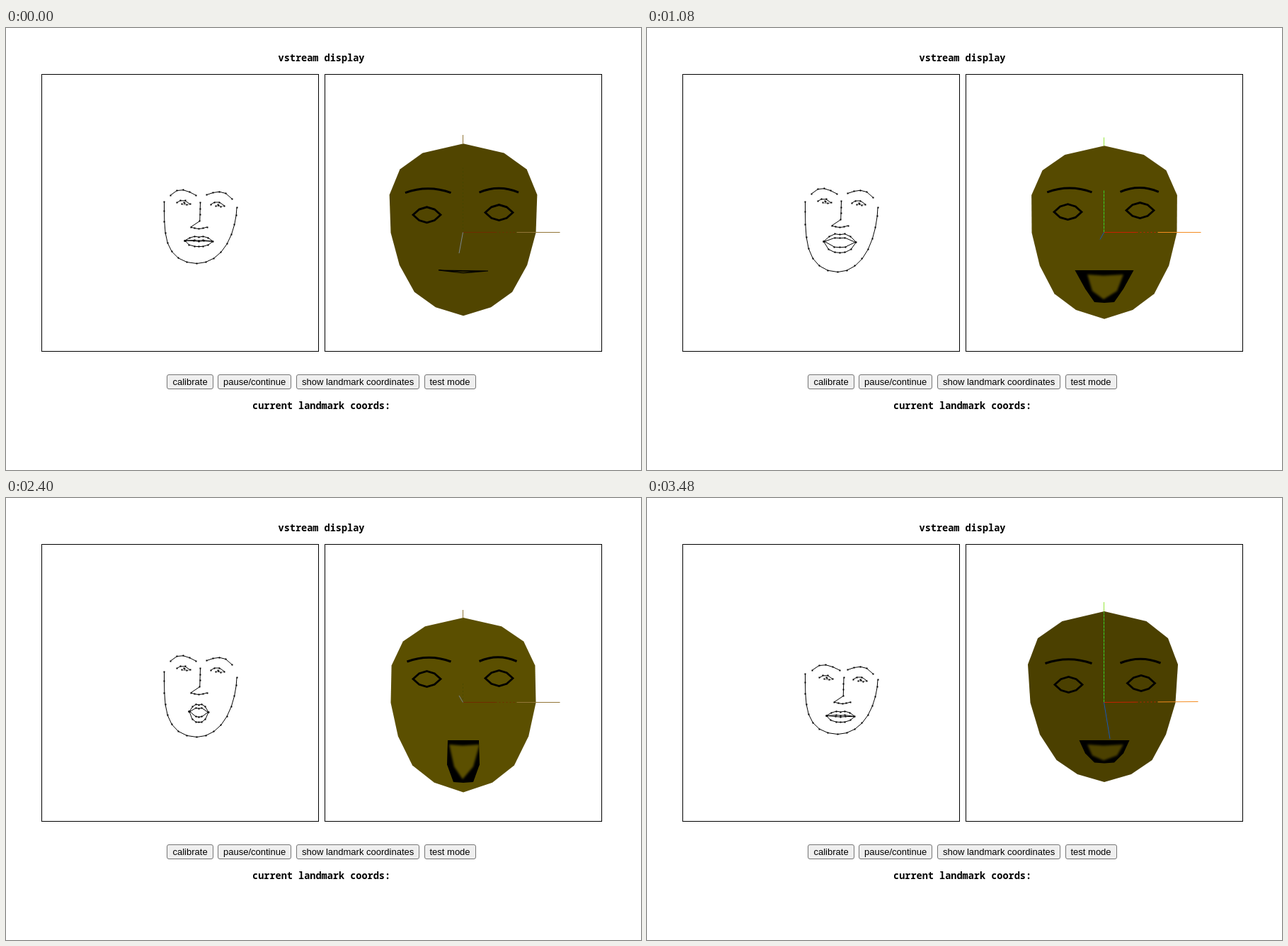
Animation, 897 px wide and 624 px high, one loop 3.6 s. Source, as an HTML page with a canvas:

```html
<!DOCTYPE html>
<html lang="en">
<head>
<meta charset="utf-8">
<title>vstream display</title>
<style>
html, body { margin: 0; width: 100%; height: 100%; overflow: hidden; background: #fff; }
svg, canvas { position: absolute; left: 0; top: 0; display: block; }
.head { font: bold 13.55px "Noto Sans Mono", "DejaVu Sans Mono", monospace; white-space: pre; }
.label { font: 13px "Liberation Sans", Arial, sans-serif; }
.panel { fill: none; stroke: #000; }
.button { fill: #efefef; stroke: #767676; }
</style>
</head>
<body>
<svg width="897" height="624" viewBox="0 0 897 624">
  <rect class="panel" x="50.5" y="65.5" width="391" height="391"/>
  <rect class="panel" x="450.5" y="65.5" width="391" height="391"/>
  <text class="head" x="384.5" y="47">vstream display</text>
  <text class="head" x="348" y="538">current landmark coords:</text>
  <rect class="button" x="227.5" y="489.5" width="65" height="20" rx="2.5"/>
  <rect class="button" x="299.5" y="489.5" width="103" height="20" rx="2.5"/>
  <rect class="button" x="410.5" y="489.5" width="173" height="20" rx="2.5"/>
  <rect class="button" x="591.5" y="489.5" width="72" height="20" rx="2.5"/>
  <text class="label" x="235.5" y="504">calibrate</text>
  <text class="label" x="307" y="504">pause/continue</text>
  <text class="label" x="418" y="504">show landmark coordinates</text>
  <text class="label" x="598.5" y="504">test mode</text>
</svg>
<canvas id="stage" width="897" height="624"></canvas>
<script>
const ctx = document.getElementById('stage').getContext('2d');
const LOOP = 3600, STEP = 120;

// eye, side, chin: heights of the tracked face; gap: its lip opening
// nod, turn, smile (half mouth width), open: the modelled head
const poses = [
  { t: 0, eye: 247, side: 246, chin: 333, gap: 1, nod: .36, turn: 0, smile: 35, open: 4, vivid: 0 },
  { t: 600, eye: 247, side: 249, chin: 337, gap: 3, nod: .68, turn: 0, smile: 37.5, open: 29, vivid: 1 },
  { t: 1080, eye: 245, side: 246, chin: 345, gap: 13, nod: .68, turn: 0, smile: 41.5, open: 46, vivid: 1 },
  { t: 2040, eye: 244, side: 247, chin: 336, gap: 11, nod: 0, turn: 0, smile: 45.5, open: 41, vivid: 1 },
  { t: 2400, eye: 241, side: 246, chin: 338, gap: 12, nod: 1, turn: 0, smile: 22, open: 60, vivid: 0 },
  { t: 2760, eye: 253, side: 255, chin: 348, gap: 7, nod: .24, turn: 1, smile: 35, open: 43.5, vivid: 0 },
  { t: 3480, eye: 254, side: 249, chin: 334, gap: 2, nod: 0, turn: 1, smile: 35.5, open: 32.5, vivid: 1 }
];

// Right half of the head: distance from the middle, height
const profile = [[0, 161], [59.5, 175], [92, 199], [106, 236], [102.5, 290], [89, 335], [67.5, 371], [38, 391], [0, 402]];

const dull = { yOut: '#927638', yIn: '#3a4400', xOut: '#927638', xIn: '#702c00', z: '#7c8890', dash: [1, 4] };
const bright = { yOut: '#98e840', yIn: '#38d028', xOut: '#f48c20', xIn: '#c82000', z: '#1858b8', dash: [4, 1] };

const mix = (a, b, k) => a + (b - a) * k;
const range = n => [...Array(n).keys()];

function poseAt(t) {
  const i = poses.findLastIndex(p => p.t <= t);
  const a = poses[i], b = poses[i + 1] || { ...poses[0], t: LOOP };
  const k = (t - a.t) / (b.t - a.t);
  const pose = {};
  for (const key in a) pose[key] = mix(a[key], b[key], k);
  pose.vivid = a.vivid;
  return pose;
}

function trace(pts, closed) {
  ctx.beginPath();
  for (const p of pts) ctx.lineTo(...p);
  if (closed) ctx.closePath();
}
function stroke(pts, color = '#000', width = 1, dash = []) {
  ctx.strokeStyle = color;
  ctx.lineWidth = width;
  ctx.setLineDash(dash);
  trace(pts);
  ctx.stroke();
  ctx.setLineDash([]);
}
function fill(pts, color) {
  ctx.fillStyle = color;
  trace(pts, true);
  ctx.fill();
}
function dots(pts) {
  ctx.fillStyle = '#000';
  for (const [x, y] of pts) ctx.fillRect(Math.round(x) - 1, Math.round(y) - 1, 2, 2);
}
function dotted(pts) {
  stroke(pts);
  dots(pts);
}

function drawJaw({ side, chin }) {
  dotted(range(17).map(i => {
    const a = Math.PI * i / 16, c = Math.cos(a);
    const bow = mix(c, Math.sin(Math.PI / 2 * c), c > 0 ? 1 : .25);
    const top = side + i / 2;
    return [270 - bow * (c > 0 ? 46 : 56.5), mix(top, chin, Math.sin(a) ** 1.2)];
  }));
}

function drawTrackedBrows({ eye, turn }) {
  const arch = k => 7.5 * Math.sin(Math.PI * k ** .8);
  const ks = range(5).map(i => i / 4);
  dotted(ks.map(k => [mix(233, 268.5, k) + turn * (1 + 3 * k), eye - 10.5 - arch(k)]));
  dotted(ks.map(k => [mix(284, 320, k), eye - 11 + 6 * k - arch(1 - k)]));
}

function drawTrackedEye(x, y) {
  const put = ([dx, dy]) => [x + dx, y + dy];
  dotted([[-10, 0], [-5, -3], [2, -3], [9, 2]].map(put));
  dots([[4, 3], [-3, 2], [0, 0], [1, 1]].map(put));
  stroke([[-3, 2], [4, 3], [9, 2]].map(put), 'rgba(0,0,0,.45)');
}

function drawNose({ eye, turn }) {
  const x = 275 + 3.5 * turn;
  const bridge = range(4).map(i => [x - i / 4, eye + i * 26 / 3]);
  const base = range(5).map(i => [x - 13.5 + i * 5.75, eye + 34.5 + 2.5 * Math.sin(Math.PI * i / 4)]);
  dotted([...bridge, ...base]);
}

function drawLips({ eye, gap, smile, turn }) {
  const w = 3 + smile * .48, mid = 273 + turn;
  const top = eye + 57 - w * .47, inTop = top + 5.5, inLow = inTop + gap, low = inLow + 8;
  const corner = inTop + gap * .4;
  const put = ([k, y]) => [mid + w * k, y];
  const shoulder = mix(corner, top, .65), cheek = mix(corner, low, .7);
  dotted([[-1, corner], [-.66, shoulder], [-.3, top], [0, top + 1], [.3, top], [.66, shoulder], [1, corner + 1],
    [.68, cheek], [.32, low - .5], [0, low], [-.32, low - .5], [-.7, cheek], [-1, corner]].map(put));
  dotted([[-.94, corner], [-.32, inTop], [0, inTop + .5], [.32, inTop], [.94, corner + 1],
    [.33, inLow], [0, inLow + .5], [-.33, inLow], [-.94, corner]].map(put));
}

function drawLandmarks(pose) {
  drawJaw(pose);
  drawTrackedBrows(pose);
  drawTrackedEye(251.5 + 2.5 * pose.turn, pose.eye + .3);
  drawTrackedEye(300 + 2 * pose.turn, pose.eye + 2.5);
  drawNose(pose);
  drawLips(pose);
}

function headOutline({ nod, turn }) {
  const half = side => profile.map(([w, y]) => {
    const s = (y - 290) / 112;
    const sway = y > 180 && y < 345 ? -2 * turn : 0;
    return [646.5 + side * w * (1 + .09 * s * nod) + sway, y + nod * s * s * (s > 0 ? 14.5 : 6.8)];
  });
  return [...half(1), ...half(-1).reverse()];
}

function drawBrow(x1, x2, y) {
  ctx.strokeStyle = '#000';
  ctx.lineWidth = 3;
  ctx.beginPath();
  ctx.moveTo(x1, y);
  ctx.quadraticCurveTo((x1 + x2) / 2, y - 11.5, x2, y);
  ctx.stroke();
}

function drawSocket(x, y) {
  const rim = range(8).map(i => {
    const a = Math.PI * i / 4;
    return [x + 19.5 * Math.sign(Math.cos(a)) * Math.abs(Math.cos(a)) ** 1.7, y + 11 * Math.sin(a) ** 1];
  });
  ctx.strokeStyle = '#000';
  ctx.lineWidth = 2.8;
  trace(rim, true);
  ctx.stroke();
}

function drawMouth({ smile, open }, skin) {
  const x = 646.5, top = 343, low = top + open, mid = top + open * .57;
  const l = x - smile, r = x + smile, cheek = Math.min(27, smile + 1);
  if (open < 8) {
    stroke([[l, top], [r, top + 1], [x, low], [l, top], [x, low - 2], [r, top + 1]], '#000', 1.1);
    return;
  }
  fill([[l, top], [r, top], [x + cheek, mid], [x + 14, low - 1], [x, low], [x - 14, low - 1], [x - cheek, mid]], '#000');
  ctx.filter = 'blur(1.5px)';
  fill([[x - cheek + 3, top + 6], [x - 1, top + 7.5], [x + cheek, top + 6], [x + cheek - 9, mid + 3],
    [x - 1, low - Math.min(5, open / 8)], [x - cheek + 10, mid + 3]], skin);
  ctx.filter = 'none';
}

function drawAxes({ nod, turn, vivid }, headTop) {
  const style = vivid ? bright : dull;
  const x = 646, y = 289.5, end = 783 - 4 * turn;
  const onX = v => [v, y - turn * (v - x) / 137];
  stroke([[x, mix(148, 159, nod)], [x, headTop]], style.yOut);
  stroke([[x, y], [x, mix(162, 262, nod)]], style.yIn, 1, style.dash);
  stroke([onX(x), onX(692)], style.xIn);
  stroke([onX(692), onX(722)], style.xIn, 1, [2, 3]);
  stroke([onX(722), onX(end)], style.xOut);
  stroke([[x, y], [640.5 + 14 * turn, mix(341, 280, nod)]], style.z);
}

function drawHead(pose) {
  const { nod, turn } = pose;
  const skin = `rgb(${mix(75, 91, nod)}, ${mix(64, 79, nod)}, 0)`;
  const outline = headOutline(pose);
  fill(outline, skin);
  drawBrow(563 + 4 * nod, 629, 234.5 - 2.5 * nod);
  drawBrow(669, 726 - 4 * nod, 234 - 2.5 * nod);
  drawSocket(595 + turn, 269.5 - 13 * nod - 5 * turn);
  drawSocket(697 + 1.5 * turn, 265 - 9.5 * nod - 2.5 * turn);
  drawMouth(pose, skin);
  drawAxes(pose, outline[0][1]);
}

function shifted(dx, dy, draw, pose) {
  ctx.save();
  ctx.translate(dx, dy);
  draw(pose);
  ctx.restore();
}

function frame() {
  const pose = poseAt(Math.floor(performance.now() % LOOP / STEP) * STEP);
  ctx.clearRect(0, 0, 897, 624);
  shifted(-.5, -.5, drawLandmarks, pose);
  shifted(-.5, -1, drawHead, pose);
  requestAnimationFrame(frame);
}
frame();
</script>
</body>
</html>
```
